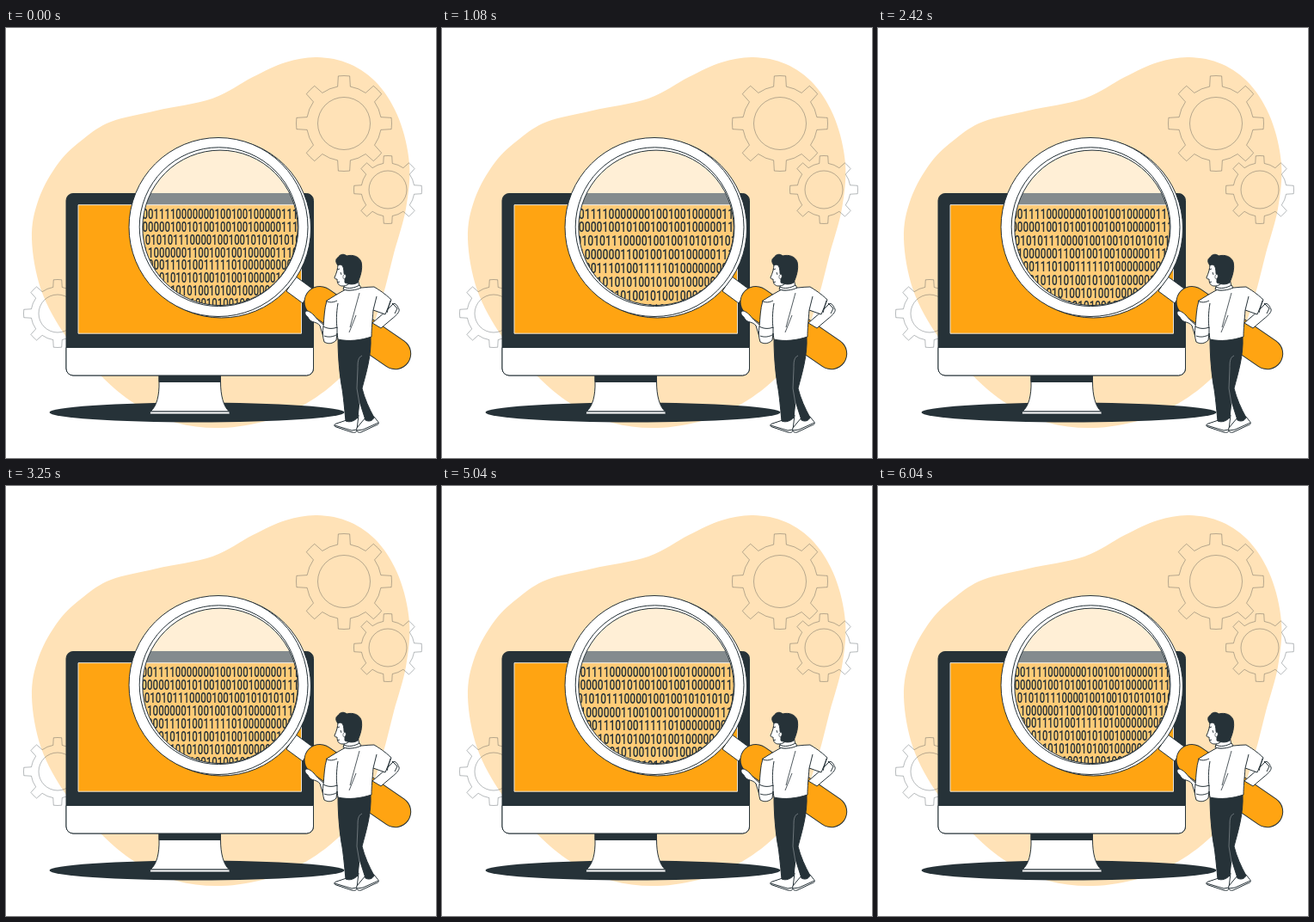
Recreate the animation shown at these times as an HTML page with a canvas. Size 500 px wide and 500 px high, loop 6.08 s.

```html
<!DOCTYPE html>
<html lang="en">
<head>
<meta charset="utf-8">
<title>Code inspection</title>
<style>
html, body { margin: 0; width: 100%; height: 100%; overflow: hidden; background: #fff; }
canvas { display: block; width: 500px; height: 500px; }
</style>
</head>
<body>
<canvas id="stage" width="500" height="500"></canvas>
<script>
const ctx = document.getElementById('stage').getContext('2d');
const LOOP = 6080;
const DARK = '#263238', ORANGE = '#ffa412', PALE = '#ffe2b7', WHITE = '#fff';
const LENS = { x: 249, y: 232.3, r: 90.2 };
const CONDENSED = 0.71; // the digits are a narrow, tall face

// Zoom of the digits: [time, scale], eased between the stops
const ZOOM = [[0, 1], [1300, 1.08], [3250, 1.012], [4700, 1.065], [LOOP, 1]];

const ROWS = [
  '0011110000000100100100000111',
  '0000010010100100100100000111',
  '0101010111000010010010101010100',
  '1100000011001001001000001110',
  '0000111010011111010000000001',
  '01010101010010100100000100',
  '010101010010100100000100',
  '01010010100100010'
];

function paint(path, fill, stroke = DARK, width = 1) {
  if (fill) { ctx.fillStyle = fill; ctx.fill(path); }
  if (stroke) { ctx.strokeStyle = stroke; ctx.lineWidth = width; ctx.stroke(path); }
}

function draw(d, fill, stroke, width) {
  paint(new Path2D(d), fill, stroke, width);
}

function disc(x, y, r) {
  const p = new Path2D();
  p.arc(x, y, r, 0, Math.PI * 2);
  return p;
}

function box(x, y, w, h, radii) {
  const p = new Path2D();
  p.roundRect(x, y, w, h, radii);
  return p;
}

// Closed smooth curve through the points
function smooth(pts) {
  const p = new Path2D(), n = pts.length, at = i => pts[(i + n) % n];
  p.moveTo(...pts[0]);
  for (let i = 0; i < n; i++) {
    const [a, b, c, d] = [at(i - 1), at(i), at(i + 1), at(i + 2)];
    p.bezierCurveTo(b[0] + (c[0] - a[0]) / 6, b[1] + (c[1] - a[1]) / 6,
      c[0] - (d[0] - b[0]) / 6, c[1] - (d[1] - b[1]) / 6, c[0], c[1]);
  }
  p.closePath();
  return p;
}

function gear(x, y, outer, body, hole) {
  const p = new Path2D(), tip = 0.12, root = 0.17;
  for (let k = 0; k < 8; k++) {
    const a = k * Math.PI / 4;
    p.arc(x, y, body, a - Math.PI / 4 + root, a - root);
    p.arc(x, y, outer, a - tip, a + tip);
    p.lineTo(x + body * Math.cos(a + root), y + body * Math.sin(a + root));
  }
  p.closePath();
  const line = 'rgba(38,50,56,.42)';
  paint(p, null, line, 0.8);
  paint(disc(x, y, hole), null, line, 0.8);
}

const blob = smooth([
  [30, 245], [38, 199], [61, 157], [90, 129], [122, 109], [175, 96], [240, 82],
  [287, 57], [325, 40], [362, 34], [400, 42], [433, 66], [457, 106], [469, 158],
  [465, 210], [451, 262], [438, 312], [421, 360], [395, 400], [355, 433],
  [305, 456], [250, 465], [198, 459], [150, 437], [111, 405], [70, 359], [41, 305]
]);

function background() {
  paint(blob, PALE, null);
  gear(393, 111, 55.5, 43.5, 30.5);
  gear(444, 188, 39.5, 31, 22);
  gear(60, 332, 39.5, 31, 22);
  const floor = new Path2D();
  floor.ellipse(222, 447, 171.5, 11.4, 0, 0, Math.PI * 2);
  paint(floor, DARK, null);
}

function monitor() {
  draw('M178 404H249.500V411C249.500 428 253 440 259.500 446H168C175 440 178.500 428 178 411Z', WHITE);
  draw('M178 404H249.500V411.500H178Z', DARK);
  paint(box(167.5, 446, 92.5, 3, 0.5), WHITE);
  paint(box(70, 192.5, 287.5, 211.5, 8), DARK);
  paint(box(70, 371.5, 287.5, 32.5, [0, 0, 8, 8]), WHITE);
  paint(box(84, 205.7, 259.5, 149.5, 0), ORANGE, '#e9e4da', 1);
}

function zoomAt(t) {
  const i = ZOOM.findIndex((stop, k) => t < ZOOM[k + 1][0]);
  const [t0, a] = ZOOM[i], [t1, b] = ZOOM[i + 1];
  return a + (b - a) * (1 - Math.cos(Math.PI * (t - t0) / (t1 - t0))) / 2;
}

function digits(zoom) {
  ctx.save();
  ctx.translate(LENS.x, 230);
  ctx.scale(zoom * CONDENSED, zoom);
  ctx.fillStyle = DARK;
  ctx.textAlign = 'center';
  ctx.textBaseline = 'alphabetic';
  ctx.font = '500 16px Roboto, sans-serif';
  ROWS.forEach((row, i) => ctx.fillText(row, 0, -7.9 + i * 14.8));
  ctx.restore();
}

function magnifier(zoom) {
  // Neck and grip
  draw('M337 289L356 303L345 320L326 306Z', WHITE);
  ctx.lineCap = 'round';
  const grip = new Path2D('M365 318.500L452.700 378.700');
  paint(grip, null, DARK, 37);
  paint(grip, null, ORANGE, 35);
  ctx.lineCap = 'butt';

  // Rim with an open middle
  const lens = disc(LENS.x, LENS.y, LENS.r);
  const outside = new Path2D();
  outside.rect(0, 0, 500, 500);
  outside.addPath(lens);
  ctx.save();
  ctx.clip(outside, 'evenodd');
  paint(disc(250.5, 233, 104), WHITE);
  paint(disc(247, 231.5, 104), WHITE);
  paint(disc(247.6, 231.2, 92.4), null);
  ctx.restore();

  ctx.save();
  ctx.clip(lens);
  ctx.fillStyle = 'rgba(255,255,255,.43)';
  ctx.fillRect(140, 120, 220, 220);
  digits(zoom);
  ctx.restore();
  paint(lens, null);
}

function man() {
  // Shoes and trousers
  draw('M396 456L384 460C381 461 381 463 384 464L402 470C406 471 408 470 408 467L410 450Z', WHITE);
  draw('M382 462L402 468L408 467', null);
  draw('M418 453L408 465C407 469 409 471 413 470L430 462C434 461 434 459 432 457L428 452Z', WHITE);
  draw('M408 468L415 467L433 459', null);
  draw('M386 361C386 382 388 405 391 420C393 434 394 447 395 457C400 459 405 457 409 453L411 434L418 456C422 458 426 457 428 453C422 442 417 431 414 419C419 400 425 381 424 359Z', DARK);
  draw('M414 381C409 383 409 389 409 396L408 419L411 437', null, '#8c9397', 0.7);

  // Far arm
  draw('M441 330L450 321C453 319 455 323 457 327C458 330 454 334 449 338L436 349L426 343Z', WHITE);
  draw('M449 320L455 326L452 332', null);

  // Near forearm and hand
  draw('M371 346C367 344 362 339 358 334C355 331 350 327 348 330C347 334 351 335 352 338C355 343 361 341 365 346L369 359L383 357Z', WHITE);

  // Shirt
  draw('M397 303C389 307 381 312 373 317C370 327 370 337 369 347C368 353 368 359 370 365C375 368 380 367 384 363L385 355L386 362C399 365 413 363 425 359C425 350 426 341 427 328L441 333L448 316C441 309 433 304 428 301C419 301 409 303 397 303Z', WHITE);
  draw('M369 347C374 350 380 350 385 348M370 358C375 360 380 359 384 357M385 348L385 357', null);
  draw('M372 317C376 320 381 319 385 317M386 320C384 332 384 342 385 349M427 328L431 312M443 331L447 317', null);
  draw('M411 308L400 348M407 334L399 354', null, DARK, 0.8);

  // Neck, face, hair
  draw('M393 293L393 304C399 306 405 304 411 301L409 291Z', WHITE);
  draw('M386 274C386 280 384 286 382 290C382 292 384 292 385 292C385 297 387 300 391 300C396 300 399 298 402 294L402 276Z', WHITE);
  draw('M389 284L390 287M385 281L388 280M385 296L388 295', null, DARK, 0.9);
  draw('M386 276C383 273 383 268 386 267C388 263 393 262 396 265C404 263 411 266 413 272C415 280 412 289 409 296C404 299 398 298 394 296L394 288C392 285 394 280 391 276C389 275 388 275 386 276Z', DARK);
  draw('M392 288C394 285 396 287 395 290C394 292 393 292 392 291Z', WHITE, DARK, 0.6);
  draw('M393 301C398 304 406 302 411 299L413 302C407 305 399 306 392 304Z', WHITE);
}

function frame(now) {
  ctx.fillStyle = WHITE;
  ctx.fillRect(0, 0, 500, 500);
  ctx.lineJoin = 'round';
  background();
  monitor();
  magnifier(zoomAt(now % LOOP));
  man();
  requestAnimationFrame(frame);
}
requestAnimationFrame(frame);
</script>
</body>
</html>
```
